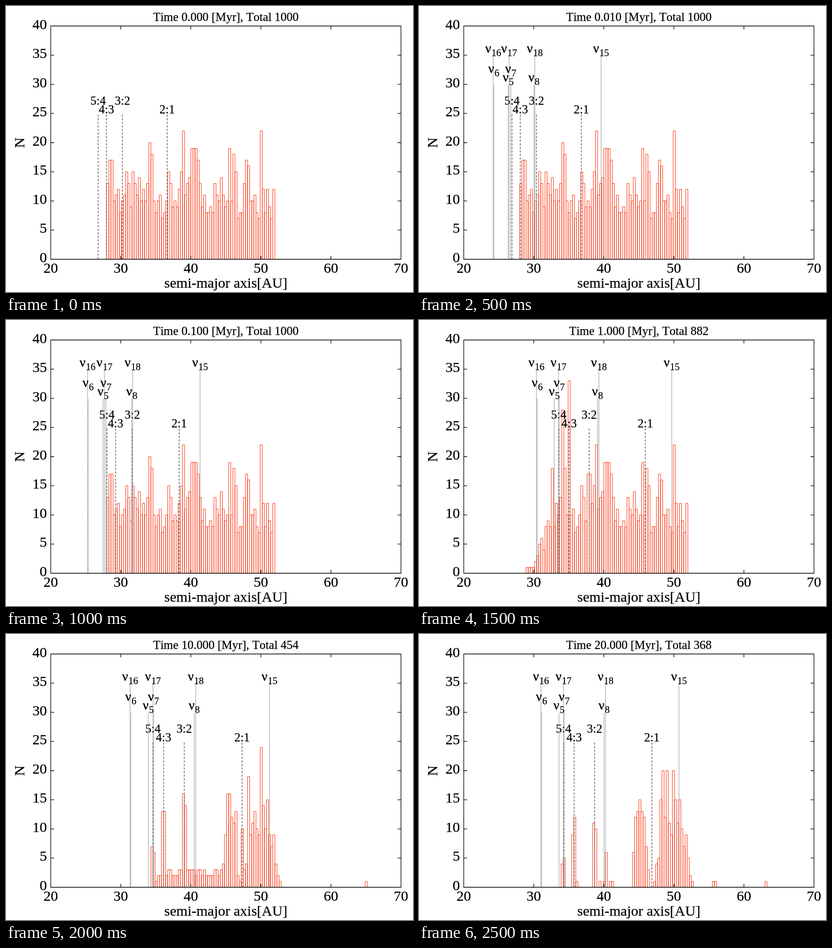
An HTML page for the animation above (3 s loop, 846 by 594 pixels).

```html
<!DOCTYPE html>
<html lang="en">
<head>
<meta charset="utf-8">
<title>Semi-major axis histogram</title>
<style>
html, body { margin: 0; width: 100%; height: 100%; overflow: hidden; background: #fff; }
svg { display: block; width: 846px; height: 594px; }
text {
  font-family: "Liberation Serif", Times, serif; font-size: 25px; font-kerning: none;
  text-anchor: middle; stroke: #000; stroke-width: .25;
}
.axis { font-size: 30px; }
.end { text-anchor: end; }
.start { text-anchor: start; }
.nu { font-size: 27px; stroke-width: .5; }
.sub { font-size: 20px; }
path, line { fill: none; }
.frame { stroke: #000; stroke-width: 1.3; }
.bars { stroke: #ff2600; stroke-width: 1; }
.mean { stroke: #808080; stroke-width: 1.9; stroke-dasharray: 4.4 3; }
.secular { stroke: #808080; stroke-width: 1.7; stroke-dasharray: 1.5 1.5; }
</style>
</head>
<body>
<svg id="plot" viewBox="0 0 846 594"></svg>
<script>
const STEP = 500, BIN = 0.3, BINS = 130;
const AXIS_START = 23.177, AXIS_END = 29.81;
const px = a => 93 + (a - 20) * 14.56;
const py = n => 526 - n * 12.1125;
const plot = document.getElementById('plot');

function add(parent, tag, attrs, text) {
  const el = document.createElementNS('http://www.w3.org/2000/svg', tag);
  for (const k in attrs) el.setAttribute(k, attrs[k]);
  if (text !== undefined) el.textContent = text;
  parent.appendChild(el);
  return el;
}
const label = (g, x, y, s, cls = '') => add(g, 'text', { x, y, class: cls }, s);
const vline = (g, x, top, cls) => add(g, 'line', { x1: x, x2: x, y1: 526, y2: top, class: cls });

// Mean motion resonance with the planet at the given axis.
const resonance = (axis, p, q) => axis * Math.pow(p / q, 2 / 3);

// A bump is [centre, height, half width, power]; a high power makes a box.
const bump = (a, [c, h, w, p = 4]) => h * Math.exp(-Math.pow(Math.abs(a - c) / w, p));
const highest = (a, list) => Math.max(0, ...list.map(b => bump(a, b)));

function noise(i) {
  const s = Math.sin((i + 1) * 12.9898) * 43758.5453;
  return s - Math.floor(s);
}

// Broad populations are noisy, narrow clumps are not.
function count(a, i, broad, clumps) {
  const level = highest(a, broad) * (0.65 + 0.7 * noise(i));
  return Math.round(Math.max(level, highest(a, clumps)));
}

const disk = [[40, 11, 12, 200]];
const clumps = [
  [28.6, 17, 0.5], [34.25, 20, 0.35], [38.95, 22, 0.12], [40.5, 19, 0.9],
  [45.55, 19, 0.1], [46.2, 18, 0.4], [48, 17, 0.5], [50.05, 22, 0.12]];

// Bodies held in 5:4, 4:3 and 3:2.
const trapped = (axis, ...heights) =>
  heights.map((h, i) => [resonance(axis, 5 - i, 4 - i), h, 0.3]);

const steps = [
  { time: 0, total: 1000, axis: 23.07, broad: disk, clumps },
  { time: 0.01, total: 1000, axis: AXIS_START, broad: disk, clumps },
  { time: 0.1, total: 1000, axis: 24.15, broad: disk, clumps },
  { time: 1, total: 882, axis: 28.93,
    broad: [[42.5, 11, 9.5, 200], [33.3, 9, 2.6, 2]],
    clumps: [...clumps.slice(1), [32.65, 18, 0.1], [34.15, 28, 0.12], [35.05, 33, 0.12], [37.9, 18, 0.3]] },
  { time: 10, total: 454, axis: AXIS_END,
    broad: [[41.2, 2.6, 6.2, 20], [45.7, 16, 0.95], [50, 13.5, 2.1]],
    clumps: [...trapped(AXIS_END, 7, 14, 16.5), [45.4, 18.5, 0.25], [47.35, 10, 0.1],
      [48.25, 19, 0.1], [50.05, 24, 0.1], [65.05, 1, 0.1]] },
  { time: 20, total: 368, axis: 29.52, shift: -0.1,
    broad: [[40.5, 0.45, 4.5], [45.25, 17, 0.95], [49.9, 14, 2.15]],
    clumps: [...trapped(29.52, 5, 12, 11), [40.35, 6, 0.1], [48.4, 20, 0.35],
      [49.05, 20, 0.1], [49.95, 20, 0.1], [55.8, 1, 0.3], [63.15, 1, 0.1]] }
];

// Index, text baseline, line top, and x at the start and end of the migration.
const secular = [
  [16, 97, 102, 154.3, 258], [17, 97, 102, 187.3, 305.6],
  [18, 97, 102, 240.7, 394.4], [15, 97, 102, 378.6, 547.8],
  [6, 139, 163, 155.6, 259.4], [7, 139, 163, 190.8, 306.8],
  [5, 157, 163, 185.5, 295.8], [8, 157, 163, 239.1, 391.3]];

function drawBars(g, { broad, clumps, shift = 0 }) {
  let d = '';
  for (let i = 0; i < BINS; i++) {
    const a = 28 + shift + i * BIN;
    const n = count(a + BIN / 2, i, broad, clumps);
    if (n) d += `M${px(a).toFixed(2)} 526V${py(n).toFixed(2)}H${px(a + BIN).toFixed(2)}V526`;
  }
  add(g, 'path', { d, class: 'bars' });
}

function drawSecular(g, axis) {
  const u = (axis - AXIS_START) / (AXIS_END - AXIS_START);
  for (const [id, y, top, from, to] of secular) {
    const x = from + (to - from) * u;
    const left = x - (id > 9 ? 16.5 : 11.5);
    vline(g, x, top, 'secular');
    label(g, left, y, 'ν', 'start nu');
    label(g, left + 13, y + 6.5, id, 'start sub');
  }
}

function drawStep(step) {
  const { time, total, axis } = step;
  const g = add(plot, 'g', { visibility: 'hidden' });
  drawBars(g, step);
  for (let q = 1; q <= 4; q++) {
    const x = px(resonance(axis, q + 1, q));
    vline(g, x, 223, 'mean');
    label(g, x, q % 2 ? 223 : 205, `${q + 1}:${q}`);
  }
  if (time > 0) drawSecular(g, axis);
  label(g, 457, 30.5, `Time ${time.toFixed(3)} [Myr], Total ${total}`);
  return g;
}

function drawAxes() {
  let d = 'M93 41.5H821V526H93Z';
  for (let a = 20; a <= 70; a += 10) {
    const x = px(a);
    d += `M${x} 526v-7M${x} 41.5v7`;
    label(plot, x, 554, a, 'axis');
  }
  for (let n = 0; n <= 40; n += 5) {
    const y = py(n);
    d += `M93 ${y}h7M821 ${y}h-7`;
    label(plot, 85, y + 6, n, 'axis end');
  }
  add(plot, 'path', { d, class: 'frame' });
  label(plot, 457, 585, 'semi-major axis[AU]', 'axis');
  add(plot, 'text', { transform: 'translate(38 284) rotate(-90)', class: 'axis' }, 'N');
}

const groups = steps.map(drawStep);
drawAxes();

const begin = performance.now();
let shown = -1;
function tick() {
  const now = Math.floor((performance.now() - begin) / STEP) % groups.length;
  if (now !== shown) {
    groups.forEach((g, i) => g.setAttribute('visibility', i === now ? 'visible' : 'hidden'));
    shown = now;
  }
  requestAnimationFrame(tick);
}
tick();
</script>
</body>
</html>
```
